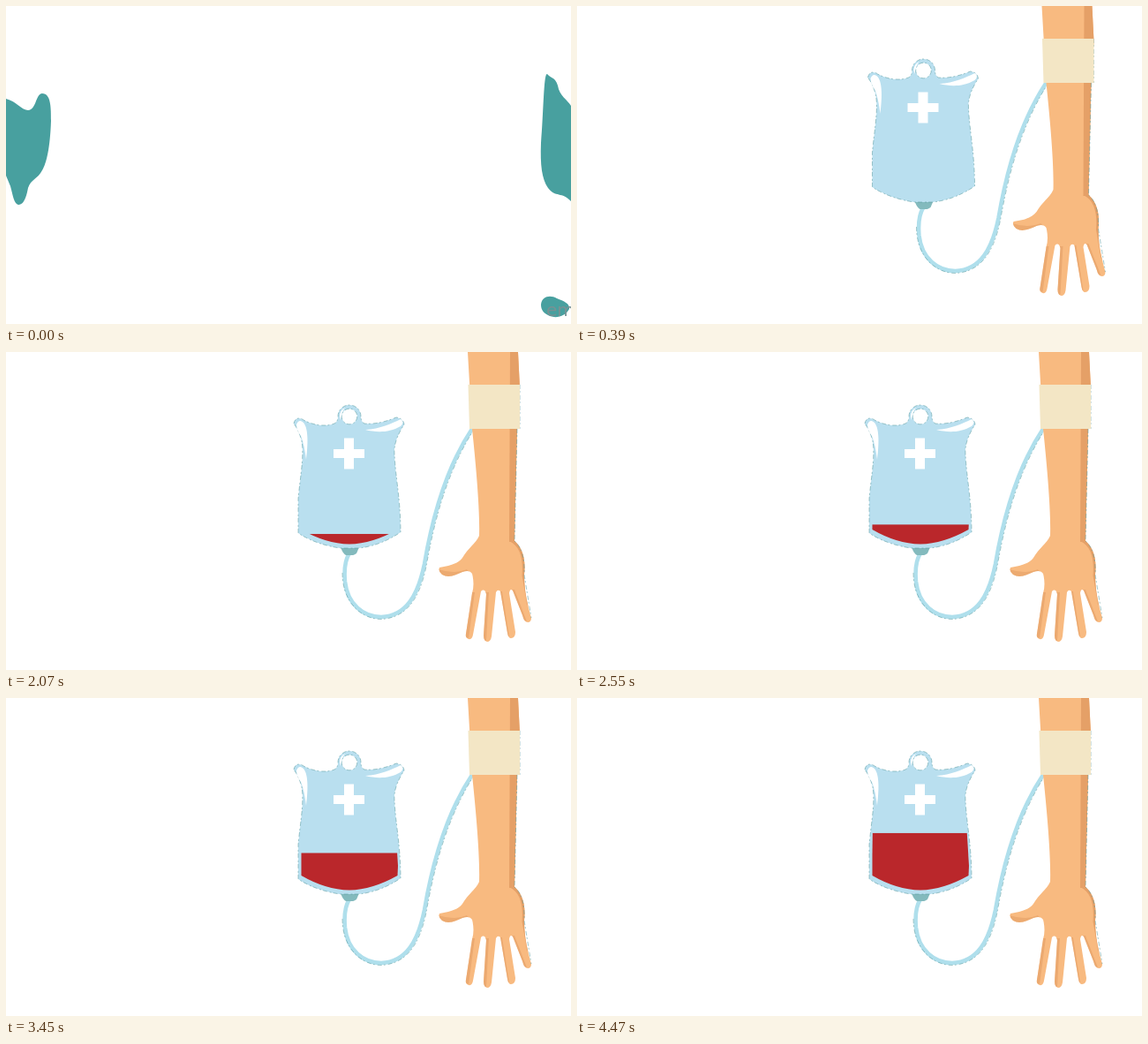
Recreate the animation shown at these times as an HTML page. Size 640 by 360 pixels, loop 4.5 s.

```html
<!DOCTYPE html>
<html lang="en">
<head>
<meta charset="utf-8">
<title>Blood donation</title>
<style>
  html, body { margin: 0; width: 100%; height: 100%; overflow: hidden; background: #fff; }
  svg { display: block; width: 100vw; height: 100vh; }
  .fringe { fill: none; stroke: #55989c; stroke-width: .7; stroke-dasharray: 5 2 2 3; opacity: .75; }
  text { font: 20px "DejaVu Sans", sans-serif; fill: #789294; }
</style>
</head>
<body>
<svg viewBox="0 0 640 360">
  <defs>
    <path id="bag" d="M326 81C327 75 332 73 337 77C348 83 362 85 372 81Q376 79 376 73A13 13 0 0 1 402 73Q402 79 406 81C418 82 430 79 442 74Q450 75 451 82C444 93 439 104 440 116C441 140 447 167 447 204C432 214 417 220 400 222H378C359 219 343 213 331 205V166C333 143 338 118 335 101Q332 89 326 81Z"/>
    <path id="arm" d="M523 0H580L582 40L579 87L576 214C585 222 589 234 587 252C587 273 591 286 595 301Q595 306 591 306Q587 306 585 298L574 270Q571 267 570 273L577 317Q577 324 572 324Q569 324 568 318L560 271Q557 268 555 272L550 322Q549 328 545 328Q541 327 541 321L544 274Q542 267 538 271L529 320Q528 326 524 325Q520 324 521 319L528 273Q531 263 528 251Q525 246 517 249C508 253 501 256 494 252Q489 248 491 244C501 242 511 241 517 233C523 222 532 217 536 208C537 179 532 125 528 87Z"/>
    <clipPath id="inside">
      <path d="M335 140H441L444 190L443.500 201Q415 217 389 217.500Q362 217 334.500 201V178Z"/>
    </clipPath>
    <clipPath id="armShape"><use href="#arm"/></clipPath>
  </defs>

  <g id="splash" fill="#48a09f">
    <path id="left" d="M0 105C12 108 18 118 25 118C35 117 33 100 41 99C51 99 51 115 51 130C50 160 46 178 41 186C36 196 28 196 25 206C22 222 18 225 14 225C9 224 8 215 5 204L0 192Z"/>
    <g id="right">
      <path d="M613 77C617 82 622 80 625 90C627 102 636 106 640 113V221C630 210 622 217 614 206C607 196 605 180 606 155C609 120 609 75 613 77Z"/>
      <path d="M606 338C607 328 617 327 624 331C632 334 639 337 638 343C634 351 624 354 616 351C609 348 606 344 606 338Z"/>
      <text x="612" y="351">em</text>
    </g>
  </g>

  <g id="scene">
    <path d="M389 228C383 237 383 249 384 260C387 286 405 300 425 300C454 299 467 274 474 240C482 193 496 135 528 87" fill="none" stroke="#afdfec" stroke-width="4.600"/>
    <path class="fringe" d="M381 250C381 284 403 302.500 425 302.500C456 301 470 275 476.500 240C485 193 498 140 528 91"/>
    <path d="M379 221H400L397 228Q394 230 393 230H385Q382 229 379 221Z" fill="#83babd"/>

    <use href="#bag" fill="#b9dfef"/>
    <use href="#bag" class="fringe"/>
    <circle cx="389" cy="73" r="8.800" fill="#fff"/>
    <circle cx="389" cy="73" r="8.800" class="fringe"/>
    <g fill="#fff">
      <path d="M329 82Q332 75 337 80C343 87 342 106 340 122Q338 105 334 95Q329 88 329 82Z"/>
      <path d="M407 88C424 87 437 81 447 76Q452 79 447 84C433 92 419 91 407 88Z"/>
      <path d="M378 73Q378 66 384 63Q380 68 379 77Z"/>
      <path d="M383 97.500H394V110H406V120H394V132.500H383V120H371V110H383Z"/>
    </g>
    <rect id="blood" x="330" width="120" height="90" fill="#ba272b" clip-path="url(#inside)"/>

    <use href="#arm" fill="#f8ba80"/>
    <g clip-path="url(#armShape)" fill="#e5a067">
      <path d="M571 0H584V215H570Z"/>
      <path d="M570 214C583 220 586 235 584.500 253L590 285L600 304L594 214Z"/>
      <path d="M527 272L520 322L524 324L531 272ZM543 272L540 327L544 327L547 272ZM558 271L567 322L570 322L562 271ZM572 269L586 304L590 305L576 269Z" opacity=".65"/>
      <path d="M490 246Q508 252 522 246L526 251L494 257Z" opacity=".6"/>
    </g>
    <path class="fringe" d="M579 87L576 214Q588 224 587 252L595 301M582 37V87"/>
    <path d="M523.500 37H582V87H525Z" fill="#f3e6c5"/>
  </g>
</svg>
<script>
  const LOOP = 4500, ENTER = 90, SLIDE = 600;
  const part = id => document.getElementById(id);
  const [splash, left, right, scene, blood] =
    ["splash", "left", "right", "scene", "blood"].map(part);
  const shift = (el, x) => el.setAttribute("transform", `translate(${x} 0)`);
  const show = (el, on) => el.setAttribute("visibility", on ? "visible" : "hidden");

  function draw(now) {
    const t = now % LOOP;
    const spread = t < ENTER ? 0 : (t - 60) * .5;
    show(splash, spread < 60);
    shift(left, -spread);
    shift(right, spread);

    show(scene, t >= ENTER);
    shift(scene, t < SLIDE ? 320 * 2 ** (-10 * t / SLIDE) : 0);
    blood.setAttribute("y", 206 - (t - 2070) * .0221);
    requestAnimationFrame(draw);
  }
  draw(performance.now());
</script>
</body>
</html>
```
